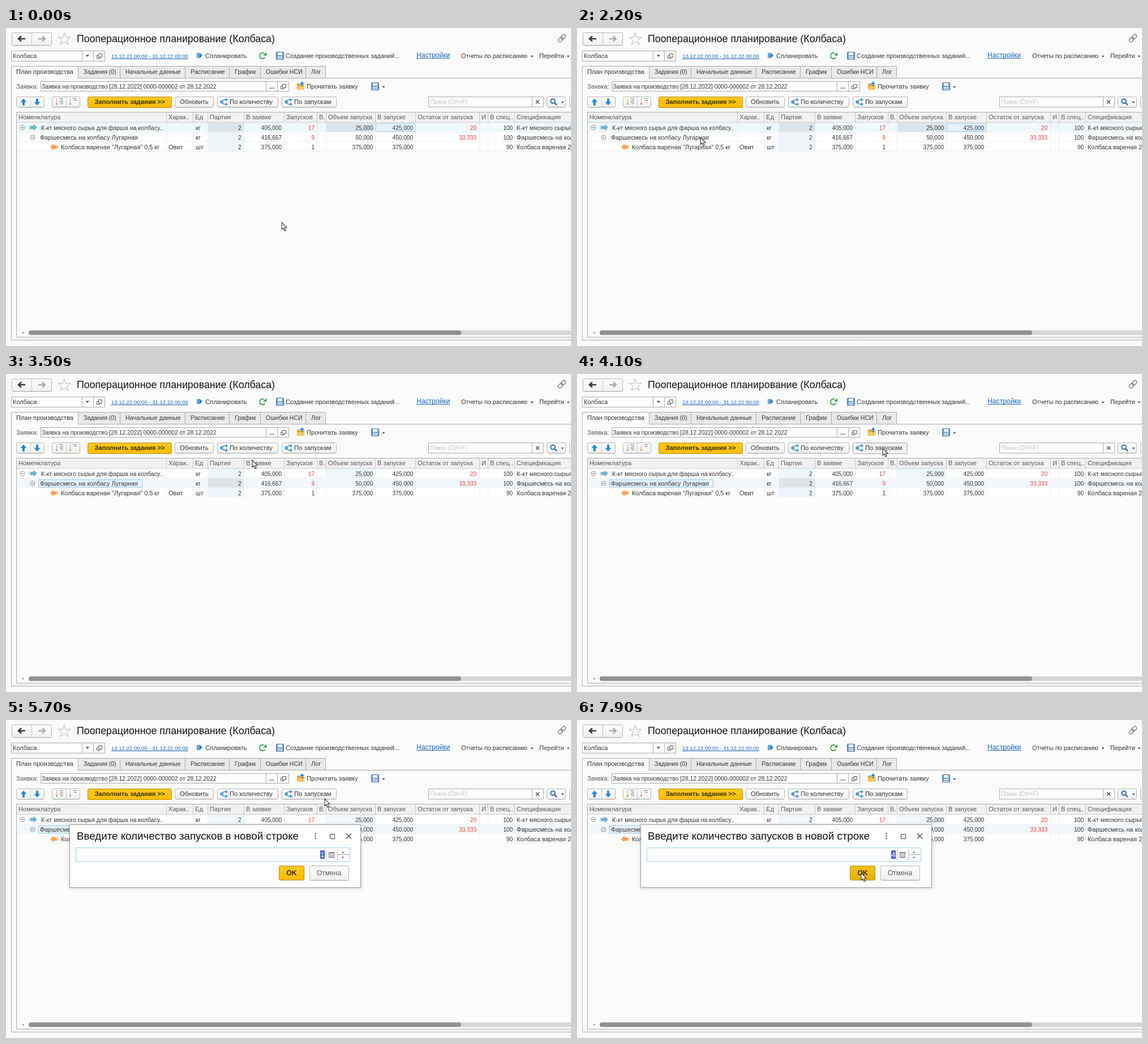
An HTML page with a canvas for the animation above (8 s loop, 998x561 px).

```html
<!DOCTYPE html>
<html lang="ru">
<head>
<meta charset="utf-8">
<title>Пооперационное планирование</title>
<style>
html, body { margin: 0; width: 100%; height: 100%; overflow: hidden; background: #fbfbfb; }
canvas { display: block; }
</style>
</head>
<body>
<canvas id="stage" width="998" height="561"></canvas>
<script>
const LOOP = 8000, STEP = 100;
const INK = '#333', DIM = '#555', RED = '#e8413c', BLUE = '#1b67b8', EDGE = '#a9a9a9';
const PAGE = '#fbfbfb', TINT = '#eef6fb', DARK_TINT = '#dde5ea', FOCUS = '#9ccdf0';
const canvas = document.getElementById('stage');
const g = canvas.getContext('2d');

function txt(s, x, y, size = 11.1, color = INK, align = 'left', bold = false) {
  g.font = `${bold ? 'bold ' : ''}${size}px "Liberation Sans", Arial, sans-serif`;
  g.textAlign = align;
  g.fillStyle = color;
  g.fillText(s, x, y);
}
function fill(x, y, w, h, color) {
  g.fillStyle = color;
  g.fillRect(x, y, w, h);
}
function line(color, width, ...p) {
  g.strokeStyle = color;
  g.lineWidth = width;
  g.beginPath();
  for (let i = 0; i < p.length; i += 2) g.lineTo(p[i], p[i + 1]);
  g.stroke();
}
function poly(color, ...p) {
  g.fillStyle = color;
  g.beginPath();
  for (let i = 0; i < p.length; i += 2) g.lineTo(p[i], p[i + 1]);
  g.closePath();
  g.fill();
}
function vline(x, y1, y2, color = EDGE) { line(color, 1, x + .5, y1, x + .5, y2); }
function hline(y, x1, x2, color = EDGE) { line(color, 1, x1, y + .5, x2, y + .5); }
function box(x, y, w, h, back = '#fff', edge = EDGE, r = 0) {
  g.beginPath();
  g.roundRect(x + .5, y + .5, w - 1, h - 1, r);
  g.fillStyle = back;
  g.fill();
  g.strokeStyle = edge;
  g.lineWidth = 1;
  g.stroke();
}
function pill(x, y, w, h, color) {
  g.fillStyle = color;
  g.beginPath();
  g.roundRect(x, y, w, h, h / 2);
  g.fill();
}
function grad(y, h, a, b) {
  const c = g.createLinearGradient(0, y, 0, y + h);
  c.addColorStop(0, a);
  c.addColorStop(1, b);
  return c;
}
function button(x, y, w, h) {
  box(x, y, w, h, grad(y, h, '#ffffff', '#f0f0f0'), '#b3b3b3', 2);
  hline(y + h, x + 2, x + w - 2, '#dcdcdc');
}
function gold(x, y, w, h, dim) {
  box(x, y, w, h, dim ? grad(y, h, '#f0c321', '#e6b000') : grad(y, h, '#fdc827', '#f8bd04'), '#b98f14', 2);
}
function drop(x, y, r = 3) { poly('#444', x - r, y - r / 2, x + r, y - r / 2, x, y + r / 2 + .5); }
function ring(x, y, r, color, width = 1, a = 0, b = Math.PI * 2) {
  g.strokeStyle = color;
  g.lineWidth = width;
  g.beginPath();
  g.arc(x, y, r, a, b);
  g.stroke();
}
function cross(x, y, r, color = '#444') {
  line(color, 1.2, x - r, y - r, x + r, y + r);
  line(color, 1.2, x - r, y + r, x + r, y - r);
}
function openIcon(x, y) {
  box(x - 4, y - 1, 6, 6, '#fff', '#555');
  box(x - 1, y - 4, 7, 7, '#fff', '#555');
}
function floppy(x, y) {
  box(x, y, 14, 14, '#6f9fca', '#3f6f9f', 1);
  fill(x + 3, y + 1, 8, 5, '#f1f5f9');
  fill(x + 3, y + 8, 8, 5, '#dfe8f0');
  line('#587fa6', 1, x + 4, y + 10.5, x + 10, y + 10.5);
}
function navArrow(x, y, dir, color) {
  line(color, 2.4, x - 6 * dir, y, x + 5 * dir, y);
  line(color, 2.4, x + 1 * dir, y - 4.5, x + 6 * dir, y, x + 1 * dir, y + 4.5);
}
function vertArrow(x, y, d) {
  poly('#2a86cc', x, y - 6 * d, x + 5.5, y, x + 2, y, x + 2, y + 6 * d, x - 2, y + 6 * d, x - 2, y, x - 5.5, y);
}
function blockArrow(x, y, d, color) {
  poly(color, x + 7 * d, y, x + 1 * d, y - 6, x + 1 * d, y - 3, x - 5 * d, y - 3, x - 5 * d, y + 3, x + 1 * d, y + 3, x + 1 * d, y + 6);
  fill(x - (d > 0 ? 7 : -6), y - 3, 1, 6, color);
}
function splitIcon(x, y) {
  const c = '#3b8fca';
  line(c, 1.5, x + 5, y - 4, x, y - 4, x - 5, y, x, y + 4, x + 5, y + 4);
  poly(c, x + 3, y - 7, x + 7, y - 4, x + 3, y - 1);
  poly(c, x + 3, y + 1, x + 7, y + 4, x + 3, y + 7);
  ring(x - 4, y, 2, c, 1.5);
}
function listIcon(x, y, n) {
  line('#e58a70', 1, x - 5.5, y - 6, x - 5.5, y + 5);
  poly('#e0704f', x - 7.5, y + 3, x - 3.5, y + 3, x - 5.5, y + 6);
  for (let i = 0; i < n; i++) line('#777', 1, x - 1 + (i % 2) * 2, y - 5.5 + i * 3, x + 6, y - 5.5 + i * 3);
}
function minus(x, y) {
  ring(x, y, 4, '#8a8a8a');
  line('#666', 1, x - 2, y, x + 2, y);
}
function link(s, x, y, size) {
  txt(s, x, y, size, BLUE);
  hline(y + 1, x, x + g.measureText(s).width, BLUE);
}

function topBar() {
  button(10, 8, 71, 23);
  vline(45, 9, 30, '#c4c4c4');
  navArrow(28, 19, -1, '#333');
  navArrow(63, 19, 1, '#a8a8a8');

  g.beginPath();
  for (let i = 0; i < 10; i++) {
    const r = i % 2 ? 4.6 : 11.5, a = i * Math.PI / 5 - Math.PI / 2;
    g.lineTo(103 + r * Math.cos(a), 20 + r * Math.sin(a));
  }
  g.closePath();
  g.strokeStyle = '#b5b5b5';
  g.lineWidth = 1;
  g.stroke();
  txt('Пооперационное планирование (Колбаса)', 125, 25, 17.8, '#111');

  g.save();
  g.translate(982, 18);
  g.rotate(-Math.PI / 4);
  g.strokeStyle = '#777';
  g.lineWidth = 1.3;
  for (const x of [-8, -1]) {
    g.beginPath();
    g.roundRect(x, -3, 9, 6, 3);
    g.stroke();
  }
  g.restore();

  box(9, 40, 166, 19);
  vline(134, 41, 58);
  vline(154, 41, 58);
  txt('Колбаса', 12, 53, 11);
  drop(144, 49);
  openIcon(164, 49);
  link('13.12.22 00:00 - 31.12.22 00:00', 186, 53, 9.56);
  fill(337, 44, 1.5, 9, '#2f7fc1');
  fill(339.5, 44, 2, 9, '#2f7fc1');
  poly('#2f7fc1', 342, 43.5, 347, 48.5, 342, 53.5);
  txt('Спланировать', 352, 53, 11);
  ring(453, 49, 5, '#2f9a46', 1.8, .5, 5.2);
  poly('#2f9a46', 460, 43, 460, 49, 454, 48);
  floppy(477, 42);
  txt('Создание производственных заданий...', 494, 53, 10.95);
  link('Настройки', 725, 52, 12.1);
  txt('Отчеты по расписанию', 804, 53, 10.9);
  drop(929, 50, 2.5);
  txt('Перейти', 942, 53, 11);
  drop(993, 50, 2.5);
}

// Left edge, text position, label, font size
const tabs = [[10, 18, 'План производства', 11.2], [128, 137, 'Задания (0)', 10.6],
  [202, 211, 'Начальные данные', 10.8], [317, 326, 'Расписание', 11], [395, 404, 'График', 11],
  [450, 459, 'Ошибки НСИ', 10.5], [530, 539, 'Лог', 11], [565]];
function tabRow() {
  box(9, 88, 1000, 463, PAGE);
  tabs.slice(0, -1).forEach(([x, tx, s, size], i) => {
    box(x - 1, 67, tabs[i + 1][0] - x + 1, 22, i ? '#e9e9e9' : PAGE, EDGE);
    txt(s, tx, 81, size);
  });
  fill(10, 88, 117, 1, PAGE);
}

function toolbar(state) {
  txt('Заявка:', 18, 107, 11, DIM);
  box(61, 94, 439, 18);
  vline(459, 95, 111);
  vline(479, 95, 111);
  txt('Заявка на производство [28.12.2022] 0000-000002 от 28.12.2022', 63, 107, 10.35);
  txt('...', 465, 107, 11, INK, 'left', true);
  openIcon(489, 103);
  poly('#e0a33c', 514, 98, 519, 98, 521, 100, 527, 100, 527, 109, 514, 109);
  poly('#f4c766', 516, 102, 528, 102, 526, 109, 514, 109);
  poly('#2a8fd0', 523, 94, 527, 99, 524, 99, 524, 103, 522, 103, 522, 99, 519, 99);
  txt('Прочитать заявку', 531, 107, 11.1);
  floppy(645, 96);
  drop(667, 104, 2.5);

  button(18, 121, 50, 19);
  vline(43, 122, 139, '#c4c4c4');
  vertArrow(31, 130.5, 1);
  vertArrow(55, 130.5, -1);
  button(81, 121, 50, 19);
  vline(106, 122, 139, '#c4c4c4');
  listIcon(95, 130, 4);
  listIcon(119, 130, 2);
  gold(144, 121, 149, 20);
  txt('Заполнить задания >>', 218.5, 134, 11.2, '#3a3000', 'center', true);
  button(298, 121, 69, 19);
  txt('Обновить', 307, 134, 11.2);
  button(373, 121, 108, 19);
  splitIcon(385, 130.5);
  txt('По количеству', 395, 134, 11.3);

  const push = state == 'press' ? 1 : 0;
  if (push) box(487, 121, 97, 20, '#dedede', '#8f8f8f', 2);
  else if (state == 'hover') box(487, 121, 97, 20, '#f1f1f1', '#a6a6a6', 2);
  else button(487, 121, 97, 19);
  splitIcon(499, 130.5 + push);
  txt('По запускам', 509, 134 + push, 11.3);

  box(746, 121, 204, 19);
  vline(929, 122, 139);
  txt('Поиск (Ctrl+F)', 749, 134, 10.2, '#bdbdbd');
  cross(939, 130.5, 3);
  button(955, 121, 34, 19);
  ring(966, 129, 3.8, '#2a6fb0', 2);
  line('#2a6fb0', 2.4, 969, 132, 973, 136);
  drop(983, 131, 2.5);
  button(995, 121, 30, 19);
}

const cols = [[18, 'Номенклатура'], [283, 'Харак..'], [330, 'Ед'], [356, 'Партия'], [420, 'В заявке'],
  [491, 'Запусков'], [549, 'В.'], [565, 'Объем запуска'], [652, 'В запуске'], [723, 'Остаток от запуска'],
  [836, 'И'], [851, 'В спец..'], [898, 'Спецификация']];
const rows = [
  [62, 'К-кт мясного сырья для фарша на колбасу..', '', 'кг', '405,000', '17', '25,000', '425,000', '20', '100', 'К-кт мясного сырья'],
  [60, 'Фаршесмесь на колбасу Лугарная', '', 'кг', '416,667', '9', '50,000', '450,000', '33,333', '100', 'Фаршесмесь на колбасу'],
  [97, 'Колбаса вареная "Лугарная" 0,5 кг', 'Овит', 'шт', '375,000', '1', '375,000', '375,000', '', '90', 'Колбаса вареная 2 сорт']];

function table(second) {
  box(18, 148, 1000, 398, PAGE);
  fill(19, 149, 980, 17, '#f2f2f2');
  hline(166, 19, 998, '#cfcfcf');
  cols.forEach(([x, s], i) => {
    g.save();
    g.beginPath();
    g.rect(x, 149, (i < 12 ? cols[i + 1][0] : 1000) - x - 1, 17);
    g.clip();
    txt(s, x + 4, 161, 11.1, DIM);
    g.restore();
  });

  rows.forEach((r, i) => {
    const top = Math.floor(167 + i * 17.3), base = top + 13;
    const active = i == (second ? 1 : 0);
    fill(19, top, 980, 17, active ? '#f1f8fc' : '#fdfdfd');
    fill(357, top, 63, 17, active ? DARK_TINT : TINT);
    if (i == 0) fill(566, top, 86, 17, active ? DARK_TINT : TINT);
    hline(top + 16, 19, 998, '#eef1f3');
    if (active) {
      if (second) box(57, top + 2, 184, 14, '#e5f2fb', FOCUS);
      else box(653, top + 1, 70, 15, '#e5f2fb', FOCUS);
    }
    txt(r[1], r[0], base, i ? 10.9 : 10.6);
    txt(r[2], 287, base, 11);
    txt(r[3], 335, base, 11);
    const num = (s, x, c = INK) => txt(s, x, base, 10.1, c, 'right');
    num('2', 415.5);
    num(r[4], 487);
    num(r[5], 545, i < 2 ? RED : INK);
    num(r[6], 648);
    num(r[7], 719);
    num(r[8], 831, RED);
    num(r[9], 895);
    txt(r[10], 902, base, 10.9);
  });
  cols.slice(1).forEach(([x]) => {
    vline(x, 149, 166, '#c6c6c6');
    vline(x, 167, 218, '#eaeef0');
  });
  minus(29, 175.5);
  minus(47, 193);
  blockArrow(48, 175.5, 1, '#72b3cc');
  blockArrow(85, 210, -1, '#f6a25a');

  pill(40, 533.5, 970, 8, '#d6d6d6');
  pill(40, 533.5, 764, 8, '#919191');
  poly('#999', 28, 537.5, 31.5, 535.5, 31.5, 539.5);
}

function dialog(t) {
  g.save();
  if (t >= 5300) {
    g.shadowColor = 'rgba(0,0,0,.2)';
    g.shadowBlur = 5;
    g.shadowOffsetY = 1;
  }
  fill(112, 184, 515, 112, '#fff');
  g.restore();
  box(112, 184, 515, 112, '#fdfdfd', '#a0a0a0');
  txt('Введите количество запусков в новой строке', 125, 211, 18.74, '#111');
  for (const dy of [-4, 0, 4]) fill(545.5, 204 + dy, 2, 2, '#444');
  box(572, 201, 9, 9, '#fdfdfd', '#444');
  cross(605.5, 205, 4.5);

  box(123, 225, 485, 25, '#fff', FOCUS);
  const value = 1 + [6600, 7000, 7400].filter(k => t >= k).length;
  fill(555, 230, 8, 15, '#4d67b5');
  txt(value, 562.3, 242, 12.2, '#fff', 'right');
  vline(565, 228, 248, '#bbb');
  vline(585, 228, 248, '#bbb');
  box(570, 233, 10, 10, '#fff', '#777');
  fill(571, 234, 8, 1.5, '#888');
  for (let i = 0; i < 9; i++) fill(572 + i % 3 * 2.4, 237 + (i / 3 | 0) * 2, 1.3, 1.2, '#666');
  if (t >= 6500 && t < 7500) fill(586, 227, 21, 11, '#eeeeee');
  hline(237, 586, 606, '#999');
  poly('#444', 593, 234.5, 597, 234.5, 595, 232);
  poly('#444', 593, 241.5, 597, 241.5, 595, 244);

  gold(482, 257, 45, 26, t >= 7800);
  txt('OK', 504.5, 274, 12.4, '#3a3000', 'center', true);
  button(536, 257, 70, 26);
  txt('Отмена', 549, 274, 12, DIM);
}

// Pointer tip: time, x, y
const path = [[1200, 487, 343], [1300, 454, 314], [1400, 411, 272], [1600, 361, 243], [1700, 314, 219],
  [1900, 256, 199], [2100, 232, 194], [2200, 218, 193], [3000, 218, 193], [3100, 236, 191], [3300, 345, 172],
  [3500, 435, 152], [3700, 492, 136], [3900, 520, 130], [4100, 540, 131], [4200, 540, 131], [4400, 554, 132],
  [4500, 560, 130], [5600, 560, 130], [5700, 563, 139], [6100, 583, 195], [6500, 597, 234], [7400, 597, 234],
  [7500, 586, 240], [7700, 532, 262], [7900, 502, 270]];
function tip(t) {
  const i = path.findIndex(k => k[0] > t);
  if (i == 0) return path[0].slice(1);
  if (i < 0) return path[path.length - 1].slice(1);
  const [a, x, y] = path[i - 1], [b, u, v] = path[i], p = (t - a) / (b - a);
  return [x + (u - x) * p, y + (v - y) * p];
}
function pointer([x, y]) {
  g.save();
  g.translate(x, y);
  g.beginPath();
  for (const [a, b] of [[0, 0], [0, 12.6], [2.8, 10], [5, 15], [7.2, 14], [5, 9.3], [9, 9]]) g.lineTo(a, b);
  g.closePath();
  g.fillStyle = '#fff';
  g.fill();
  g.strokeStyle = '#333';
  g.lineWidth = 1.1;
  g.stroke();
  g.restore();
}

function draw(t) {
  fill(0, 0, 998, 561, PAGE);
  topBar();
  tabRow();
  toolbar(t >= 4900 && t < 5100 ? 'press' : t >= 3900 && t < 4900 ? 'hover' : '');
  table(t >= 2400);
  if (t >= 5100) dialog(t);
  pointer(tip(t));
}
let last = -1;
function tick() {
  const t = Math.floor(performance.now() % LOOP / STEP) * STEP;
  if (t != last) draw(last = t);
  requestAnimationFrame(tick);
}
tick();
</script>
</body>
</html>
```
